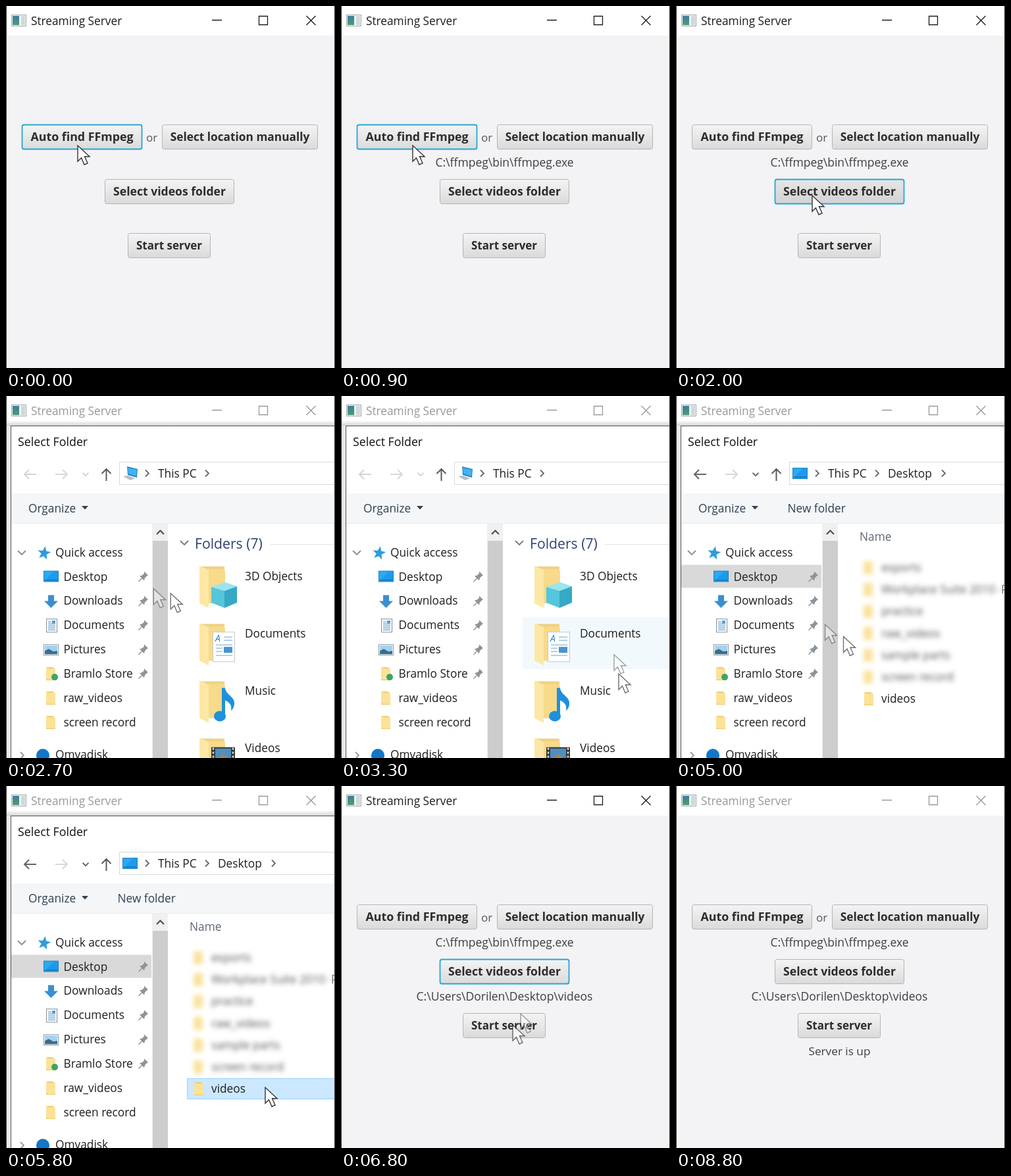
Animation, 500 px wide and 550 px high, one loop 8.9 s. Source, as an HTML page:

```html
<!DOCTYPE html>
<html lang="en">
<head>
<meta charset="utf-8">
<title>Streaming Server</title>
<style>
  html, body { margin: 0; width: 100%; height: 100%; overflow: hidden; background: #f3f2f4; }
  svg { display: block; width: 500px; height: 550px; }
  text { font-family: "Open Sans", "Noto Sans", sans-serif; font-variant-ligatures: none; white-space: pre; }
</style>
</head>
<body>
<svg id="stage" viewBox="0 0 500 550" xmlns="http://www.w3.org/2000/svg"></svg>
<script>
const LOOP = 8900, STEP = 100;
const DIALOG_OPEN = 2400, DESKTOP_OPEN = 4400, DIALOG_CLOSE = 6500, BLUR_WINDOW = 8500;

// Drawing helpers
const text = (x, y, s, { size = 17.3, fill = '#1f1f1f', extra = '' } = {}) =>
  `<text x="${x}" y="${y}" font-size="${size}" fill="${fill}" ${extra}>${s}</text>`;
const rect = (x, y, w, h, fill, extra = '') =>
  `<rect x="${x}" y="${y}" width="${w}" height="${h}" fill="${fill}" ${extra}/>`;
const line = (d, stroke, width = 1.5, extra = '') =>
  `<path d="${d}" fill="none" stroke="${stroke}" stroke-width="${width}" ${extra}/>`;
const shape = (d, fill, extra = '') => `<path d="${d}" fill="${fill}" ${extra}/>`;
const group = (id, content, extra = '') => `<g id="${id}" ${extra}>${content}</g>`;
const at = (x, y, content) => `<g transform="translate(${x} ${y})">${content}</g>`;
const chevron = (x, y, color) => line(`M${x} ${y - 5}l5 5l-5 5`, color, 1.8);
const chevronDown = (x, y, color, r = 6) => line(`M${x - r} ${y - r / 2}l${r} ${r}l${r} ${-r}`, color, 1.8);

// Main window
function button(id, x, y, w, label, size) {
  const middle = x + w / 2;
  return group(id,
    rect(x + .5, y + .5, w - 1, 37, 'url(#face)', 'class="face" rx="3" stroke="#b4b4b6"') +
    rect(x + .5, y + .5, w - 1, 37, 'none', 'class="ring" rx="3" stroke="#25a5d5" stroke-width="1.8"') +
    text(middle, y + 25.3, label, { size, fill: '#2c2c2c', extra: 'font-weight="700" text-anchor="middle"' }));
}
const status = (id, y, s, size = 17.5) =>
  text(248.5, y, s, { size, fill: '#3f3f41', extra: `id="${id}" text-anchor="middle"` });

const titleBar = rect(0, 0, 500, 45, '#fff') +
  rect(8.5, 13.5, 22, 17, '#f1f4f4', 'stroke="#a3abad"') +
  rect(10, 15, 10, 14, 'url(#appIcon)') + rect(23, 15, 6, 14, '#cdd9da') +
  group('caption',
    text(38, 29, 'Streaming Server', { fill: 'currentColor' }) +
    line('M313 21.5h15M384.5 15.5h13v13h-13zM456.5 15l14 14M470.5 15l-14 14', 'currentColor', 1.3));

const mainWindow = rect(0, 0, 500, 550, '#f3f2f4') + titleBar +
  button('auto', 24, 180, 183, 'Auto find FFmpeg', 17.8) +
  text(213, 206, 'or', { size: 17, fill: '#555' }) +
  button('manual', 237, 180, 237, 'Select location manually', 17.3) +
  button('videos', 150, 263, 197, 'Select videos folder', 17.6) +
  button('start', 185, 345, 126, 'Start server', 17) +
  status('ffmpegPath', 244, 'C:\\ffmpeg\\bin\\ffmpeg.exe') +
  status('videosPath', 326, 'C:\\Users\\Dorilen\\Desktop\\videos') +
  status('serverUp', 409, 'Server is up', 17.2);

// Folder dialog icons
const folder = shape('M0 0h10l4 3v17H0z', '#eecb74') + shape('M0 0l4 2h10v17H4l-4-1z', '#fbe296');
const monitor = rect(0, 0, 23, 17, '#1780c6') + rect(1, 1, 21, 15, '#2ba9f2') +
  shape('M1 16L16 1h6v15z', '#1c9bea') + rect(2, 13.5, 19, 1.5, '#1274b8');
const page = rect(.5, .5, 16, 20, '#fff', 'stroke="#848d96"') +
  line('M3 5h5M3 8h11M3 11h11M3 14h11M3 17h11', '#5c9bcc', 1.3) + rect(9, 3, 5, 4, '#4a98d2');
const picture = rect(.5, .5, 22, 16, '#fff', 'stroke="#8d959b"') + rect(2, 2, 19, 13, '#9fd2f3') +
  shape('M2 15v-5l6-3l7 4l6-1v5z', '#3c6c86');
const download = shape('M6 0h9v9h6L10.500 19.500L0 9h6z', '#3a8fd0');
const pin = shape('M9 0l6 6l-2 1l-3 3l-1 4l-3-3l-5 5l-1-1l5-5l-3-3l4-1l3-3z', '#8b949c');
const star = shape('M11 0l2.6 7l7.4.5l-6 4.7l2 7.3l-6-4.2l-6.2 4l2.2-7L1 8l7.3-.5z', '#2c9be0', 'transform="rotate(10 11 10)"');
const thisPc = shape('M6 0l16 4l-1 13l-14-4z', '#2480c0') + shape('M7 2l14 3l-1 10l-12-4z', '#41b3f3') +
  shape('M0 15l7-1l11 4l-7 3z', '#b3bec6');
const bigFolder = shape('M1 1h37v56H1z', '#f0d183') + shape('M10 5h27l2 3v48H10z', '#f7da8a') +
  shape('M0 0l14 6v58L0 57z', '#fce7a6');

// Folder dialog
const ROW = 36.9;
const places = [
  ['Desktop', monitor, 57, 9], ['Downloads', download, 58, 9], ['Documents', page, 61, 10],
  ['Pictures', picture, 57, 8],
  ['Bramlo Store', folder + '<circle cx="13" cy="15" r="5" fill="#3fa463"/>', 61, 10],
  ['raw_videos', folder, 61, 10], ['screen record', folder, 61, 10],
];
const sidebar =
  group('treeArrow', chevronDown(24, 238, 'currentColor')) + at(47, 228, star) + text(75, 244, 'Quick access') +
  rect(8, 256.5, 213, 35, '#cce8ff', 'id="placeRow"') +
  places.map(([name, icon, x, half], i) => {
    const y = 274.5 + i * ROW;
    return at(x, y - half, icon) + text(87.5, y + 6, name) + (i < 5 ? at(201, y - 8, pin) : '');
  }).join('') +
  chevron(22, 546, '#999') + '<circle cx="56" cy="546" r="10" fill="#1277c9"/>' + text(75, 551, 'Omvadisk') +
  rect(222, 194, 24, 356, '#f0f0f0') + rect(223, 220, 23, 330, '#cdcdcd') +
  line('M229 210l5.5-5.5l5.5 5.5', '#505050', 2.2);

const toolbar =
  text(18, 76, 'Select Folder', { size: 17.8, fill: '#111' }) +
  group('history',
    line('M46 119H28m7-7l-7 7l7 7', 'currentColor', 2) + chevronDown(121, 119, 'currentColor', 4.5)) +
  line('M75 119h18m-7-7l7 7l-7 7', '#d8d8d8', 2) +
  line('M152.5 129v-18m-7 7l7-7l7 7', '#5a5a5a', 2) +
  rect(172.5, 100.5, 340, 34, '#fff', 'stroke="#d9d9d9"') +
  chevron(212, 117.5, '#666') + text(231, 124, 'This PC') + chevron(303, 117.5, '#666') +
  rect(8, 148, 492, 45, '#f5f6f7') + rect(8, 193, 492, 1, '#ebecee') +
  text(34, 177, 'Organize', { fill: '#2f4256' }) + shape('M115 167h10l-5 5.5z', '#2f4256');

const cube = shape('M0 7l20 6v26L0 31z', '#55c6dc') + shape('M20 13l19-7v25l-19 8z', '#35a9c6') +
  shape('M0 7L21 0l18 6l-19 7z', '#9be4ef');
const bigPage = rect(.5, .5, 33, 45, '#fff', 'stroke="#c3c9ce"') +
  text(4, 15, 'A', { size: 14, fill: '#2b83c4', extra: 'font-style="italic"' }) +
  line('M17 8h13M17 13h13M5 20h25M5 25h10M5 30h10M5 36h25', '#9cc3e2', 1.5) + rect(17, 23, 13, 9, '#4795cc');
const note = shape('M12 0h5c1 11 15 13 14 24c0 5-3 9-5 11c2-10-4-14-9-16v22h-5z', '#1e91dc') +
  '<ellipse cx="9" cy="43" rx="9" ry="8" fill="#1e91dc"/>';
const film = rect(0, 0, 36, 28, '#353535') + rect(6, 2, 24, 20, '#4e90bd') + shape('M6 20l12-9l12 9v4H6z', '#b98042') +
  line('M3 1v26M33 1v26', '#ddd', 2.5, 'stroke-dasharray="3 3"');
const libraries = [['3D Objects', cube, 18, 25], ['Documents', bigPage, 20, 13],
  ['Music', note, 22, 11], ['Videos', film, 18, 14]];
const pcPane =
  at(178, 107, thisPc) + chevronDown(271, 223, '#777') +
  text(287, 232, 'Folders (7)', { size: 21.2, fill: '#2f4272' }) + rect(401, 225, 99, 1, '#e4e4e4') +
  rect(276, 336, 224, 79, '#f2f9fd', 'id="libraryRow"') +
  libraries.map(([name, badge, dx, dy], i) => {
    const y = 258 + i * 87.2;
    return at(294, y, bigFolder + at(dx, dy, badge)) + text(363, y + 21.5, name);
  }).join('');

const hiddenNames = ['exports', 'Workplace Suite 2010 -', 'practice', 'raw_videos', 'sample parts', 'screen record'];
const smudge = hiddenNames.map((name, i) => {
  const y = 261 + i * 33.2;
  return `<g ${i > 1 ? 'class="late"' : ''}>` + rect(285, y - 10, 14, 20, '#fae29c') +
    text(312, y + 6, name, { fill: '#555' }) + '</g>';
}).join('');
const desktopPane =
  at(177, 109, monitor) + text(322, 124, 'Desktop', { extra: 'id="crumb"' }) +
  group('pathEnd', chevron(404, 117.5, '#666')) +
  text(169.5, 177, 'New folder', { fill: '#2f4256', extra: 'id="newFolder"' }) +
  text(279, 220, 'Name', { fill: '#5d6775' }) +
  group('smudge', smudge, 'filter="url(#soft)"') + text(494, 300, 'P', { fill: '#777' }) +
  rect(275.5, 444.5, 240, 31, '#cce8ff', 'id="fileRow"') +
  group('file', at(286, 450, folder) + text(312, 466, 'videos'));

const shadow = rect(0, 37, 500, 8, 'url(#shade)') + rect(1, 45, 6, 505, '#e9e9ea');
const dialog = shadow + rect(7.5, 45.5, 520, 540, '#fff', 'stroke="#555"') + toolbar + sidebar +
  group('pcPane', pcPane) + group('desktopPane', desktopPane);

const pointer = shape('M0 0v24l5.5-5.3l4.5 10.3l5-2.2l-4.5-10h7.5z', '#fff', 'class="arrow" stroke="#333" stroke-width="1.4"') +
  shape('M-2 1c2-2 5-1 5 2v10c2-2 5-1 5 1c2-2 4-1 5 1c2-1 4 0 4 2v8c0 5-3 8-6 9h-8c-3-2-7-9-10-13c-1-3 2-4 4-2l1 1z',
    '#fff', 'class="hand" stroke="#333" stroke-width="1.5"');

const stage = document.getElementById('stage');
const stops = (id, a, b) =>
  `<linearGradient id="${id}" x2="0" y2="1"><stop stop-color="${a}"/><stop offset="1" stop-color="${b}"/></linearGradient>`;
stage.innerHTML = '<defs>' + stops('face', '#f4f4f4', '#dadada') + stops('pressed', '#e6e6e6', '#d2d2d3') +
  stops('appIcon', '#3b7d9c', '#4f9b78') + stops('shade', '#fff', '#d4d4d4') +
  '<filter id="soft" x="-10%" y="-10%" width="120%" height="120%"><feGaussianBlur stdDeviation="3.6"/></filter></defs>' +
  mainWindow + group('dialog', dialog) +
  rect(0, 0, 1, 550, '#3a3a3a') + rect(499, 0, 1, 550, '#3a3a3a') +
  group('trail', pointer) + group('cursor', pointer);

const el = Object.fromEntries([...stage.querySelectorAll('g[id], text[id], rect[id]')].map(n => [n.id, n]));
const show = (node, on) => node.setAttribute('display', on ? 'inline' : 'none');
const fade = (node, value) => node.setAttribute('opacity', value);
const within = (t, from, to) => t >= from && t < to;

// Cursor stops: time, x, y
const route = [
  [0, 109, 212], [1000, 109, 212], [1300, 145, 240], [1700, 207, 288], [2600, 207, 288], [3000, 380, 335],
  [3240, 415, 393], [3300, 422, 422], [3400, 425, 432], [3600, 410, 425], [4200, 115, 273], [4700, 115, 273],
  [5300, 394, 458], [5900, 394, 458], [6300, 510, 570], [6400, 530, 500], [6600, 400, 330],
  [6740, 273, 346], [6800, 261, 363], [7000, 252, 366], [7300, 248, 368], [8400, 248, 368], [8700, 520, 520], [LOOP, 520, 520],
];
function cursorAt(t) {
  const i = Math.max(1, route.findIndex(p => p[0] > t));
  const [a, b] = [route[i - 1], route[i]];
  const k = Math.max(0, (t - a[0]) / (b[0] - a[0]));
  return [a[1] + (b[1] - a[1]) * k, a[2] + (b[2] - a[2]) * k];
}

function placeCursor(t, inDialog) {
  const now = cursorAt(t), before = cursorAt(t - 60);
  const moving = Math.hypot(now[0] - before[0], now[1] - before[1]) > 3;
  const hand = inDialog && now[0] < 222 && within(now[1], 256, 515);
  [[el.cursor, now], [el.trail, before]].forEach(([node, [x, y]]) => {
    node.setAttribute('transform', `translate(${x} ${y})`);
    show(node.querySelector('.hand'), hand);
    show(node.querySelector('.arrow'), !hand);
  });
  fade(el.cursor, moving ? .7 : 1);
  show(el.trail, moving);
  fade(el.trail, .45);
  return now;
}

function render(t) {
  const inDialog = within(t, DIALOG_OPEN, DIALOG_CLOSE);
  const active = !inDialog && t < BLUR_WINDOW;
  const focus = !active ? '' : t < 1900 ? 'auto' : t < 7500 ? 'videos' : 'start';
  const pressed = within(t, 400, 600) ? 'auto' : within(t, 1900, DIALOG_OPEN) ? 'videos' : within(t, 7500, 7700) ? 'start' : '';
  for (const id of ['auto', 'manual', 'videos', 'start']) {
    show(el[id].querySelector('.ring'), id === focus);
    el[id].querySelector('.face').setAttribute('fill', `url(#${id === pressed ? 'pressed' : 'face'})`);
  }
  el.caption.setAttribute('color', active ? '#1c1c1c' : '#999');
  show(el.ffmpegPath, t >= 600);
  show(el.videosPath, t >= DIALOG_CLOSE);
  show(el.serverUp, t >= 7700);

  const [x, y] = placeCursor(t, inDialog);
  const onDesktop = t >= DESKTOP_OPEN, loaded = t > DESKTOP_OPEN;
  show(el.dialog, inDialog);
  show(el.pcPane, !onDesktop);
  show(el.desktopPane, onDesktop);
  el.history.setAttribute('color', onDesktop ? '#666' : '#d4d4d4');
  el.treeArrow.setAttribute('color', x < 222 ? '#444' : '#8c8c8c');

  const overPlace = x < 222 && within(y, 256, 292);
  show(el.placeRow, onDesktop || overPlace);
  el.placeRow.setAttribute('fill', !onDesktop ? '#e5f3ff' : overPlace ? '#cce8ff' : '#d9d9d9');
  el.placeRow.setAttribute('stroke', onDesktop && overPlace ? '#99d1ff' : 'none');
  show(el.libraryRow, x > 276 && within(y, 336, 425));

  show(el.pathEnd, loaded);
  fade(el.crumb, loaded ? 1 : .75);
  fade(el.newFolder, loaded ? 1 : .2);
  fade(el.file, loaded ? 1 : .5);
  el.smudge.querySelectorAll('.late').forEach(node => fade(node, loaded ? 1 : .25));
  const picked = t >= 5500;
  show(el.fileRow, picked || (x > 276 && within(y, 444, 476)));
  el.fileRow.setAttribute('fill', picked ? '#cce8ff' : '#e5f3ff');
  el.fileRow.setAttribute('stroke', picked ? '#99d1ff' : 'none');
}

const begin = performance.now();
function tick() {
  const t = (performance.now() - begin) % LOOP;
  render(Math.floor(t / STEP) * STEP);
  requestAnimationFrame(tick);
}
tick();
</script>
</body>
</html>
```
